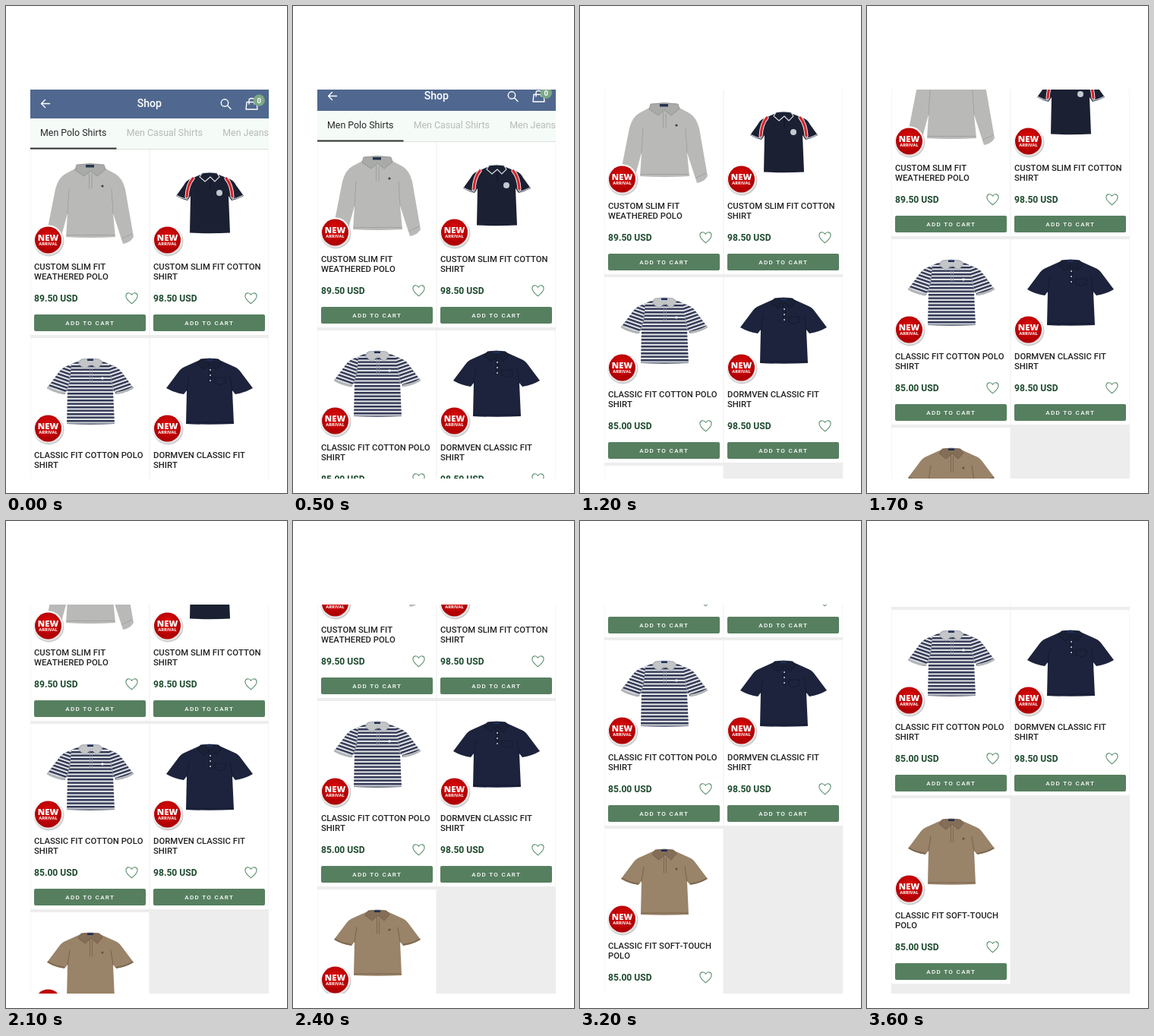
Write an HTML page that moves like this. It is 370x641 px and loops after 4100 ms.

```html
<!DOCTYPE html>
<html lang="en">
<head>
<meta charset="utf-8">
<title>Shop</title>
<style>
  html, body { margin: 0; width: 100%; height: 100%; overflow: hidden; background: #fff; }
  svg { display: block; font-family: Roboto, sans-serif; }
  .tab { font-size: 12.4px; fill: #b6bab7; }
  .name { font-size: 11.3px; font-weight: 500; font-kerning: none; fill: #222; }
  .price { font-size: 12.1px; font-weight: 600; fill: #1d4a2d; }
  .add { font-size: 8.1px; font-weight: 500; letter-spacing: 1.3px; fill: #fff; }
  .badge { font-weight: 800; fill: #fff; text-anchor: middle; }
  .new { font-family: "Open Sans", sans-serif; }
  .line { fill: none; stroke-linecap: round; stroke-linejoin: round; }
</style>
</head>
<body>
<svg width="370" height="641" viewBox="0 0 370 641">
  <defs>
    <clipPath id="screen"><path d="M32 110H346V622H32Z"/></clipPath>
    <radialGradient id="red" cy=".4"><stop offset=".4" stop-color="#d00808"/><stop offset="1" stop-color="#b00004"/></radialGradient>
    <linearGradient id="ring" x2="0" y2="1"><stop stop-color="#fff"/><stop offset="1" stop-color="#e2e2e2"/></linearGradient>
    <pattern id="stripes" width="10" height="4.5" patternUnits="userSpaceOnUse">
      <path d="M0 0H10V4.5H0Z" fill="#e6e7ea"/><path d="M0 0H10V2.4H0Z" fill="#2c3350"/>
    </pattern>
    <pattern id="stripesLeft" href="#stripes" patternTransform="rotate(19)"/>
    <pattern id="stripesRight" href="#stripes" patternTransform="rotate(-19)"/>
    <!-- Card artwork is laid out in card coordinates, 156 by 244 -->
    <path id="polo" d="M66 29L46 38Q41 40 37 46L22 66Q32 72 45 74L49 69L48 113Q79 114.5 111 113L109 69L113 74Q126 72 136 66L121 46Q117 40 112 38L92 29Z"/>
    <path id="collar" d="M67 28Q79 26 91 28L95 33L88 41L80 34L72 41L63 34Z"/>
    <g id="new">
      <circle cx="24.3" cy="120.2" r="20.2" fill="#0003"/>
      <circle cx="23.5" cy="119" r="19.8" fill="url(#ring)"/>
      <circle cx="23.5" cy="119" r="17.5" fill="url(#red)"/>
      <text class="badge new" x="23.5" y="120.2" font-size="11.3">NEW</text>
      <text class="badge new" x="23.5" y="126.3" font-size="5.8" style="font-weight:700">ARRIVAL</text>
    </g>
    <path id="heart" class="line" stroke="#5f9270" stroke-width="1.1" d="M133.5 202.8C128 198.5 125.9 195.8 125.9 192.8C125.9 188.4 131 187.2 133.5 191.2C136 187.2 141.1 188.4 141.1 192.8C141.1 195.8 139 198.5 133.5 202.8Z"/>
  </defs>
  <g clip-path="url(#screen)">
    <path d="M32 110H346V622H32Z" fill="#ededed"/>
    <g id="page">
      <path d="M32 110H346V148H32Z" fill="#50688f"/>
      <g class="line" stroke="#fff" stroke-width="1.4">
        <path d="M57.5 128.5H47M51.5 123.5L46.5 128.5L51.5 133.5"/>
        <circle cx="288" cy="127.5" r="4.7"/><path d="M291.5 131L296 135.5"/>
        <path d="M317 126.5H330L331 136H316ZM320 129V124.5Q320 121.5 323.5 121.5T327 124.5V129"/>
      </g>
      <circle cx="333.3" cy="124.2" r="7.6" fill="#7da886"/>
      <text class="badge" x="333.3" y="127.6" font-size="9.5" style="font-weight:700">0</text>
      <text x="172.7" y="133.3" font-size="14.1" font-weight="500" fill="#fff">Shop</text>
      <path d="M32 148H346V188H32Z" fill="#f5fbf7"/>
      <path d="M32 188H346V189H32Z" fill="#dcdfdd"/>
      <path d="M32 186.5H145.5V188.5H32Z" fill="#333"/>
      <text class="tab" x="45" y="171" style="fill:#262626">Men Polo Shirts</text>
      <text class="tab" x="158.7" y="171">Men Casual Shirts</text>
      <text class="tab" x="285.3" y="171">Men Jeans</text>
      <g id="cards"></g>
    </g>
  </g>
</svg>
<script>
const dots = (color, ...points) =>
  points.map(([x, y, r = 1]) => `<circle cx="${x}" cy="${y}" r="${r}" fill="${color}"/>`).join('');

const line = (d, color, width = 1) =>
  `<path class="line" d="${d}" stroke="${color}" stroke-width="${width}"/>`;

const label = '<path d="M75 27.5H83V30H75Z" fill="#1f2f58"/>';

const cuffs = (color, width) =>
  line('M23.5 65.5Q32 71 44 72.5M114 72.5Q126 71 134.5 65.5', color, width);

const polo = (fill, collar, shade, details) => `
  <use href="#polo" fill="${fill}"/>
  ${details}
  ${line('M49 69L52 50M109 69L106 50M49 111H110', shade, .8)}
  <use href="#collar" fill="${collar}" stroke="${shade}" stroke-width=".8"/>
  ${line('M78.5 36V58M81.5 38V58', shade, .7)}${label}`;

const stripedSleeves = `
  <path d="M54 34.5L46 38Q41 40 37 46L22 66Q32 72 45 74L52 58Z" fill="url(#stripesLeft)"/>
  <path d="M104 34.5L112 38Q117 40 121 46L136 66Q126 72 113 74L106 58Z" fill="url(#stripesRight)"/>`;

const longSleeve = `
  <path d="M61 24L46 32Q37 37 33 52L21 113Q24 121 37 124L40 117L49 84L47 115Q79 117 112 115L109 84L122 124Q131 123 136 115L125 52Q121 37 112 32L97 24Z" fill="#b9bab7"/>
  ${line('M49 84L51 52M109 84L107 52M24 113L38 117M121 117L134 111M48 112.5H111', '#9a9c99', .8)}
  <path d="M61 20Q79 17 97 20L99 26L88 35L79 28L71 35L59 27Z" fill="#a9aba8" stroke="#8c8e8b" stroke-width=".8"/>
  ${line('M77.5 31V51M81 33V51', '#979997', .8)}
  <path d="M73 20H84V23.5H73Z" fill="#26324f"/>${dots('#38404f', [95, 48, 1.6])}`;

const redStripes = 'M57 38Q50 46 49 62M101 38Q108 46 109 62';
const raglan = `
  <path d="M67 33L53 39Q48 41 45 47L35 61Q42 65 50 67L54 61L53 109.5Q79 111 106 109.5L104 61L108 67Q116 65 124 61L114 47Q111 41 106 39L91 33Z" fill="#1b2032"/>
  ${line('M36 60.5Q42 64 50 65.5M108.5 65.5Q116 64 122.5 60.5', '#d8dae0', 1.2)}
  ${line(redStripes, '#efeff1', 5)}${line(redStripes, '#d5242b', 3.2)}
  <path d="M69 31Q79 29 89 31L92 36L86 42L80 36L73 42L66 36Z" fill="#1b2032" stroke="#e4e5e9" stroke-width="1.1"/>
  ${line('M80 40V52', '#0f1424')}${dots('#c5c8cf', [92, 57, 4])}`;

const products = [
  ['CUSTOM SLIM FIT', 'WEATHERED POLO', '89.50', longSleeve],
  ['CUSTOM SLIM FIT COTTON', 'SHIRT', '98.50', raglan],
  ['CLASSIC FIT COTTON POLO', 'SHIRT', '85.00', polo('url(#stripes)', '#c3c5c7', '#999da6',
    stripedSleeves + cuffs('#b4b7ba', 3) + dots('#f4f4f4', [95, 53, 1.7]))],
  ['DORMVEN CLASSIC FIT', 'SHIRT', '98.50', polo('#1d233c', '#1a2036', '#111729',
    line('M86 52H100V59L93 62L86 59Z', '#131a31') + dots('#d5d7dd', [80, 42], [80, 49], [80, 56]))],
  ['CLASSIC FIT SOFT-TOUCH', 'POLO', '85.00', polo('#998369', '#846e57', '#705b46',
    cuffs('#7d6851', 2) + dots('#62503f', [95, 53, 1.5]))],
];

document.getElementById('cards').innerHTML = products.map(([first, second, price, shirt], i) => `
  <g transform="translate(${32 + i % 2 * 157} ${189 + (i >> 1) * 248})">
    <path d="M.5 0H156.5V244H.5Z" fill="#fff"/>
    ${shirt}
    <use href="#new"/>
    <text class="name" x="5" y="158.2">${first}</text>
    <text class="name" x="5" y="171.2">${second}</text>
    <text class="price" x="5" y="200">${price} USD</text>
    <use href="#heart"/>
    <rect x="5" y="217" width="147" height="22" rx="2" fill="#567f5f"/>
    <text class="add" x="46.3" y="231.2">ADD TO CART</text>
  </g>`).join('');

const page = document.getElementById('page');

function draw() {
  const steps = Math.floor((performance.now() % 4100 - 400) / 100);
  const scroll = 10 * Math.min(32, Math.max(0, steps));
  page.setAttribute('transform', `translate(0 ${-scroll})`);
  requestAnimationFrame(draw);
}
draw();
</script>
</body>
</html>
```
